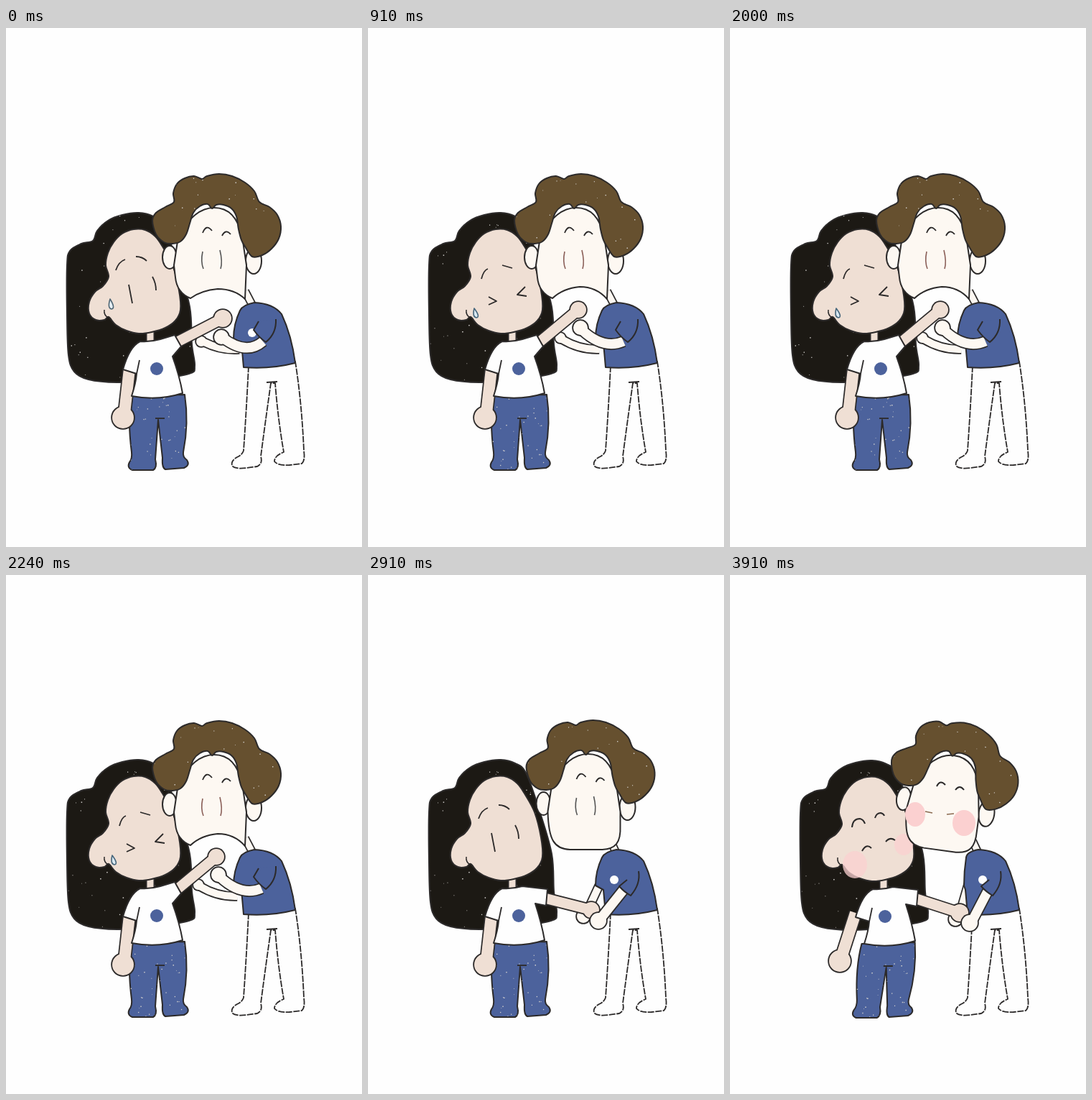
An HTML page with a canvas for the animation above (3.94 s loop, 496 by 722 pixels).

```html
<!DOCTYPE html>
<html>
<head>
<meta charset="utf-8">
<style>
html, body { margin: 0; width: 100%; height: 100%; overflow: hidden; background: #fefefe; }
canvas { display: block; }
</style>
</head>
<body>
<canvas id="stage" width="496" height="722"></canvas>
<script>
const ctx = document.getElementById('stage').getContext('2d');
const LOOP = 3940, STEP = 110.9;
const INK = '#2c2a2a', SKIN = '#efdfd4', PALE = '#fdf8f2', BLUE = '#4c629c',
      BLACK = '#1c1914', BROWN = '#66502f', WHITE = '#fefefe', PINK = '#fbd0d0';

// Arms per pose: her fist, his front and back arms with hands [x, y, radius].
const poses = {
  pull: { fist: [302, 404, 12], front: 'M358 436Q335 456 302 431', hand: [300, 430, 10],
          back: 'M325 447Q300 449 276 437', rear: [272, 436, 7], arch: 363 },
  bite: { fist: [287, 380, 13], front: 'M356 432Q325 442 293 410', hand: [290, 406, 11],
          back: 'M325 441Q300 440 272 423', rear: [270, 421, 8], arch: 352 },
  chew: { fist: [293, 392, 11], front: 'M356 436Q328 448 298 420', hand: [296, 417, 10],
          back: 'M322 447Q295 448 270 433', rear: [268, 431, 7], arch: 360 },
  hold: { fist: [311, 466, 11], front: 'M356 438L324 478', hand: [321, 481, 11],
          back: 'M322 432L303 473', rear: [300, 475, 9] },
  kiss: { fist: [320, 470, 12], front: 'M360 438L337 482', hand: [334, 484, 11],
          back: 'M332 430L319 475', rear: [314, 479, 9] }
};

function poseAt(step) {
  if (step === 0 || step === 23) return 'pull';
  if (step < 23) return step % 2 ? 'bite' : 'chew';
  return step < 27 ? 'hold' : 'kiss';
}

function shape(d, fill, width = 2, ink = INK) {
  const path = new Path2D(d);
  if (fill) { ctx.fillStyle = fill; ctx.fill(path); }
  if (width) { ctx.lineWidth = width; ctx.strokeStyle = ink; ctx.stroke(path); }
  return path;
}
const line = (d, width = 1.8, ink = INK) => shape(d, null, width, ink);

// Closed smooth outline through "x,y" points.
function smooth(text) {
  const pts = text.split(' ').map(p => p.split(',').map(Number));
  const at = i => pts[(i + pts.length) % pts.length];
  const handle = (i, k) => at(i).map((v, j) => v + k * (at(i + 1)[j] - at(i - 1)[j]) / 6);
  return 'M' + pts[0] + pts.map((_, i) => `C${handle(i, 1)} ${handle(i + 1, -1)} ${at(i + 1)}`).join('') + 'Z';
}

const HER_HAIR = smooth('85,330 89,310 105,300 121,296 127,282 142,268 162,260 185,257 205,262 220,275 238,325 256,388 259,440 263,470 255,481 200,490 155,493 115,489 95,478 87,455 85,400');
const HER_FACE = smooth('135,359 143,346 139,330 142,313 150,298 162,286 178,280 194,281 208,290 218,304 232,330 241,365 243,392 236,407 222,417 203,423 185,425 168,421 153,413 143,402 137,406 125,406 116,397 116,381 124,367');
const HIS_HAIR = smooth('204,268 209,257 222,249 234,242 233,230 238,217 249,209 262,206 273,210 280,206 297,203 315,206 333,215 346,227 353,242 367,249 378,260 383,276 380,293 370,307 357,316 343,318 333,304 328,295 324,280 321,262 314,251 303,246 293,246 287,251 281,245 270,248 261,257 256,272 251,287 243,297 232,300 220,298 209,287');

function oval(x, y, rx, ry, fill, width = 0) {
  ctx.beginPath();
  ctx.ellipse(x, y, rx, ry, 0, 0, 7);
  ctx.fillStyle = fill;
  ctx.fill();
  if (width) { ctx.lineWidth = width; ctx.strokeStyle = INK; ctx.stroke(); }
}

// Arm and hand share one outline: dark pass first, fill pass on top.
function limb(d, w, [x, y, r], fill) {
  line(d, w + 3.5);
  oval(x, y, r + 1.8, r + 1.8, INK);
  line(d, w, fill);
  oval(x, y, r, r, fill);
}

function specks(path, [x, y, w, h], count, seed) {
  const rnd = () => (seed = seed * 16807 % 2147483647) / 2147483647;
  ctx.save();
  ctx.clip(path);
  ctx.fillStyle = '#d5d3d0';
  for (let i = 0; i < count; i++) {
    const s = 0.7 + rnd() * 0.8;
    ctx.fillRect(x + rnd() * w, y + rnd() * h, s, s);
  }
  ctx.restore();
}

function group(draw, x = 0, y = 0, angle = 0, cx = 0, cy = 0) {
  ctx.save();
  ctx.translate(x + cx, y + cy);
  ctx.rotate(angle);
  ctx.translate(-cx, -cy);
  draw();
  ctx.restore();
}

function blush(alpha, ...spots) {
  ctx.globalAlpha = alpha;
  spots.forEach(s => oval(...s, PINK));
  ctx.globalAlpha = 1;
}

function herHead(pose, step, glow) {
  const hair = shape(HER_HAIR, BLACK);
  specks(hair, [85, 258, 175, 235], 55, 911 + step % 3);
  line('M201 414V440', 12.5);
  line('M201 412V442', 9, SKIN);
  shape(HER_FACE, SKIN);
  line('M137 392Q136 399 142 403', 1.5);
  if (pose === 'kiss') {
    blush(glow * 0.75, [161, 402, 17, 19], [229, 374, 13, 15]);
    line('M157 350Q158 338 168 338Q173 339 175 345M189 337Q191 330 197 330Q201 331 202 334M171 383Q177 372 184 379M204 370Q210 363 217 368', 2);
  } else if (pose === 'hold' || pose === 'pull') {
    const shift = pose === 'hold' ? 1 : 0;
    group(() => line('M153 337Q157 325 166 322M181 318Q190 318 196 324M171 357L176 383M204 346Q209 355 209 365'), shift, shift * 2);
  } else {
    line('M158 349Q161 337 167 335M187 330L201 334M168 374L179 380L168 385M219 360L208 371L221 373');
  }
  if (pose === 'pull') shape('M145 377Q141 390 147 391Q153 390 145 377Z', '#e6eff5', 1.6, '#4f6674');
  if (pose === 'bite' || pose === 'chew') shape('M148 390Q145 402 151 403Q157 402 148 390Z', '#d8e8f1', 1.6, '#45657b');
}

function hisHead(pose, step, arch) {
  const closed = !arch;
  oval(228, 319, 10, 16, PALE, 2);
  oval(345, 324, 11, 18, PALE, 2);
  const chin = closed
    ? 'L335 350C336 374 328 382 310 383L265 383C243 382 235 370 234 330Z'
    : `L333 377Q318 ${arch} 295 ${arch}Q272 ${arch + 2} 257 376Q238 368 236 347L234 330Z`;
  shape('M234 330L240 290Q262 250 290 250Q320 250 329 290L335 330' + chin, PALE);
  const hair = shape(HIS_HAIR, BROWN);
  specks(hair, [205, 205, 178, 112], 26, 401 + step % 3);
  if (pose !== 'kiss') {
    line('M274 285Q279 272 287 282M301 289Q306 279 313 287');
    line('M274 311Q271 325 275 335M298 309Q302 325 299 335', 1.6, closed || pose === 'pull' ? '#555' : '#8a5f58');
  }
}

function hisFace(glow) {
  blush(glow, [258, 333, 14, 17], [326, 345, 16, 18]);
  line('M288 294Q293 284 300 292M314 299Q320 291 326 299', 2);
  line('M272 329L282 331M302 333L312 332', 1.6, '#8b6a50');
}

function hisBody(pose, p) {
  const low = pose === 'hold' || pose === 'kiss';
  const dx = pose === 'kiss' ? 9 : 0;
  ctx.setLineDash([9, 1.5]);
  shape('M338 470Q335 530 331 588Q329 594 322 597Q313 602 315 609Q319 614 335 612L350 610Q358 606 355 596Q361 550 369 494L375 494Q379 545 387 590Q374 595 374 603Q379 609 395 608L412 606Q417 602 415 588Q412 520 403 464Z', WHITE, 1.8);
  ctx.setLineDash([]);
  line('M363 493L378 492');
  limb(p.back, 10, p.rear, PALE);
  shape(`M346 382Q330 385 ${326 + dx / 3} 393Q${317 + dx} 412 ${317 + dx} 432L328 438L331 472Q368 475 403 466Q398 428 384 398Q372 383 346 382Z`, BLUE);
  if (pose === 'pull' || low) oval(343 + dx, 424, 6, 6, WHITE);
}

function hisArm(pose, p) {
  limb(p.front, 13, p.hand, PALE);
  const low = pose === 'hold' || pose === 'kiss';
  shape(low ? 'M361 424L350 433Q357 441 366 446Q380 430 377 412' : 'M352 408L345 420Q353 431 362 437Q377 425 376 405', BLUE);
}

function herBody(pose, p, step) {
  const kiss = pose === 'kiss', low = kiss || pose === 'hold', dx = kiss ? 12 : 0;
  ctx.save();
  if (kiss) ctx.transform(1, 0, -0.085, 1, 52, 1);
  const jeans = shape('M175 512Q169 545 175 590Q176 599 172 604Q168 612 176 615L205 615Q211 612 208 600L212 545L218 598Q217 612 222 614L248 612Q257 608 252 601Q246 597 247 590Q255 550 249 510Z', BLUE);
  specks(jeans, [172, 512, 80, 103], 38, 77 + step % 3);
  line('M208 543H221');
  ctx.restore();

  limb(`M${240 + dx} ${low ? 448 : 436}L${p.fist[0]} ${p.fist[1]}`, 14, p.fist, SKIN);
  if (kiss) limb('M175 470L155 532', 16, [153, 537, 15], SKIN);
  else limb('M172 474L165 536', 16, [163, 542, 15], SKIN);
  const sleeve = low ? 'L250 437L248 460L233 457' : 'L235 427L244 443L232 457';
  group(() => {
    shape(`M187 436Q201 437 215 433${sleeve}Q242 485 246 508Q212 519 175 512Q181 494 182 481L163 475Q172 443 187 436Z`, WHITE);
    line('M182 481L186 462');
    oval(kiss ? 204 : 210, 474, 9, 9, BLUE);
  }, dx, dx && 1);
}

function draw(t) {
  const step = Math.floor(t / STEP), pose = poseAt(step), p = poses[pose];
  const kiss = pose === 'kiss', hold = pose === 'hold';
  const glow = Math.min(1, Math.max(0, (step - 26) / 6));
  ctx.fillStyle = WHITE;
  ctx.fillRect(0, 0, 496, 722);
  ctx.lineJoin = 'round';

  group(() => herHead(pose, step, glow), kiss ? 13 : 0, kiss ? 1 : 0);
  const neck = kiss || hold ? 'M338 370L347 389' : 'M333 366L344 387';
  line(neck, 12);
  line(neck, 8.5, PALE);
  group(() => hisHead(pose, step, p.arch), kiss ? 13 : hold ? 16.5 : 0, hold ? -1 : 0,
    kiss ? 0.135 : 0, 286, 323);
  if (kiss) hisFace(glow);
  hisBody(pose, p);
  herBody(pose, p, step);
  hisArm(pose, p);
  if (step >= 28 && step < 32) {
    group(() => shape('M0 10Q-11 1 -8 -5Q-4 -11 0 -4Q4 -11 8 -5Q10 1 0 10Z', '#f8261f', 0), 232, 353, -0.3);
  }
}

function tick(now) {
  draw(now % LOOP);
  requestAnimationFrame(tick);
}
draw(0);
requestAnimationFrame(tick);
</script>
</body>
</html>
```
